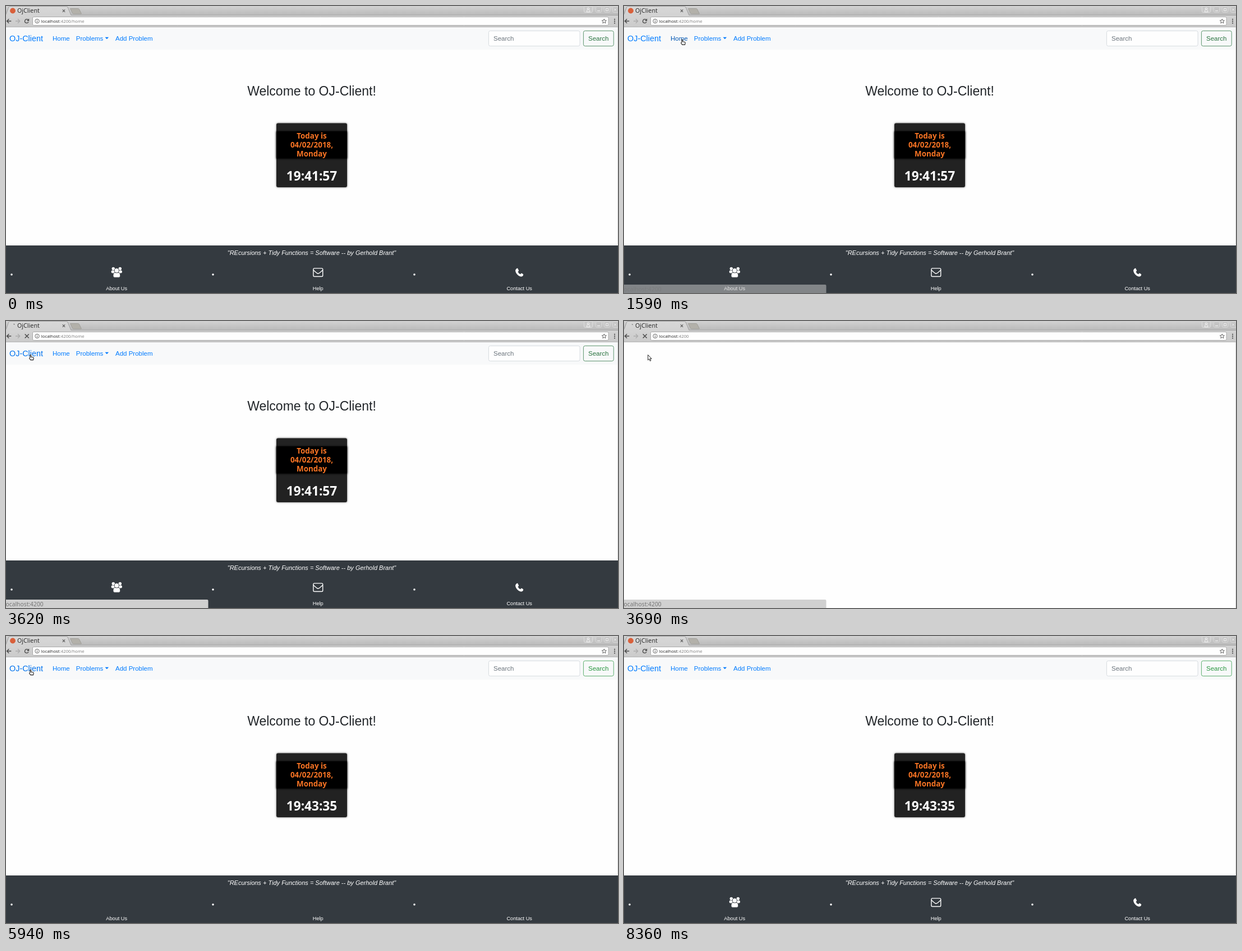
Animation of 1091x513 px, one loop 9340 ms. Source, as an HTML page with a canvas:

```html
<!DOCTYPE html>
<html lang="en">
<head>
<meta charset="utf-8">
<title>OjClient</title>
<style>
  html, body { margin: 0; width: 100%; height: 100%; overflow: hidden; background: #fefefe; }
  canvas { display: block; }
</style>
</head>
<body>
<canvas id="stage" width="1091" height="513"></canvas>
<script>
const W = 1091, H = 513, LOOP = 9340;
const ctx = document.getElementById('stage').getContext('2d');
const SANS = '"Liberation Sans", Arial, sans-serif';
const NOTO = '"Noto Sans", "Open Sans", sans-serif';

// Page life cycle, in ms
const RELOAD = 3400, BLANK = 3680, LOADED = 5935, ICONS = 6005;
const STATUS_IN = 1590, STATUS_FULL = 1640, STATUS_OUT = 3950;

const mix = (a, b, u) => a + (b - a) * u;
const smooth = u => u * u * (3 - 2 * u);
const easeOut = u => 1 - Math.pow(1 - u, 2.1);

// Pointer strokes, sampled in even steps; at(u) gives the place for progress 0..1
const MOVES = [
  { from: 430, to: 1390, steps: 16, at: u => {
    const bend = .855, d = easeOut(u);
    return d < bend
      ? [mix(673, 152.5, d / bend), mix(398, 144.5, d / bend)]
      : [mix(152.5, 103, (d - bend) / (1 - bend)), mix(144.5, 59.5, (d - bend) / (1 - bend))];
  } },
  { from: 2320, to: 3140, steps: 14, at: u => {
    const turn = .42;
    const x = u < turn ? mix(103, 4.8, smooth(u / turn)) : mix(4.8, 43, smooth((u - turn) / (1 - turn)));
    return [x, 60 + 13 * Math.sin(Math.PI * Math.min(1, u / .385))];
  } },
  { from: 6070, to: 6570, steps: 9, at: u => [mix(43, 103, smooth(mix(.1, 1, u))), 60] },
  { from: 8050, to: 8360, steps: 6, at: u => {
    const d = Math.pow((u * 5 + 1) / 5, 1.7);
    return [mix(103, 725, d), mix(60, 503, d)];
  } }
];

function pointer(t) {
  const m = MOVES.filter(s => t >= s.from).pop();
  if (!m) return null;
  const n = m.steps - 1;
  const i = Math.min(n, Math.floor((t - m.from) / (m.to - m.from) * n + 1e-6));
  const [x, y] = m.at(i / n);
  return { x, y };
}

function text(s, x, y, font, color, align = 'left') {
  ctx.font = font;
  ctx.fillStyle = color;
  ctx.textAlign = align;
  ctx.fillText(s, x, y);
}
function rect(x, y, w, h, color) {
  ctx.fillStyle = color;
  ctx.fillRect(x, y, w, h);
}
function round(x, y, w, h, r, fill, stroke, lw = 1) {
  ctx.beginPath();
  ctx.roundRect(x, y, w, h, r);
  paint(fill, stroke, lw);
}
function paint(fill, stroke, lw = 1) {
  if (fill) { ctx.fillStyle = fill; ctx.fill(); }
  if (stroke) { ctx.strokeStyle = stroke; ctx.lineWidth = lw; ctx.stroke(); }
}
function disc(x, y, r, fill, stroke, lw) {
  ctx.beginPath();
  ctx.arc(x, y, r, 0, 7);
  paint(fill, stroke, lw);
}
function shape(d, x, y, fill, stroke, lw = 1) {
  const p = new Path2D(d);
  ctx.save();
  ctx.translate(x, y);
  if (fill) { ctx.fillStyle = fill; ctx.fill(p); }
  if (stroke) { ctx.strokeStyle = stroke; ctx.lineWidth = lw; ctx.stroke(p); }
  ctx.restore();
}
function fade(y0, y1, a, b) {
  const g = ctx.createLinearGradient(0, y0, 0, y1);
  g.addColorStop(0, a);
  g.addColorStop(1, b);
  return g;
}

function spinner(t) {
  const s = (t - BLANK) / 1000;
  const sweep = .45 + 1.9 * (1 - Math.cos(s * 5.77)) / 2;
  const start = -.9 + s * 3;
  ctx.beginPath();
  ctx.arc(12, 8.5, 3.7, start, start + sweep);
  paint(null, '#555', 1.1);
}

function windowButtons() {
  const c = '#eee';
  round(1030.5, .5, 15, 11, 2, '#c9c9c9', '#dedede');
  disc(1038, 4.7, 1.7, null, c, 1.2);
  shape('M0 4 Q0 0 3 0 Q6 0 6 4 Z', 1035, 6.5, null, c);
  for (const x of [1051, 1066, 1081]) round(x + .5, 1.5, 10, 10, 2, '#c4c4c4', '#d8d8d8');
  rect(1054, 8, 5, 1.2, c);
  ctx.strokeStyle = c;
  ctx.strokeRect(1069.5, 4.5, 4, 4);
  shape('M0 0 L4 4 M4 0 L0 4', 1084, 4.5, null, c);
}

function browser(t) {
  const busy = t >= RELOAD && t < LOADED;
  const bare = t >= BLANK && t < LOADED;
  rect(0, 0, W, 17, fade(0, 17, '#d2d2d2', '#b9b9b9'));
  rect(0, 16, W, 1, '#a4a4a4');
  rect(0, 17, W, 21, fade(17, 38, '#d3d3d3', '#cacaca'));
  rect(0, 37, W, 1, '#b4b4b4');
  shape('M-1 17 L5 1.5 Q5.5 .5 7 .5 H107 Q109 .5 110 2 L116 16.5 V17.5 H-1 Z', 0, 0, fade(0, 17, '#d8d8d8', '#d2d2d2'));
  shape('M0 15 L5 1.5 Q5.5 .5 7 .5 H107 Q109 .5 110 2 L116 16.5', 0, 0, null, '#999', .9);
  shape('M0 0 H14 Q15.5 0 16 1.3 L20 9.5 H6 Q4.5 9.5 4 8.3 Z', 114.5, 4.5, '#b3b1aa', '#a09f9a');
  if (busy) spinner(t);
  else disc(12, 8.5, 4.9, '#d9603b');
  text('OjClient', 20, 12.3, '10.7px ' + NOTO, '#303030');
  shape('M0 0 L4.4 4.4 M4.4 0 L0 4.4', 100.8, 6.4, null, '#555', 1.1);
  windowButtons();

  shape('M8.5 4 H1 M4.5 .3 L.8 4 L4.5 7.7', .8, 23, null, '#484848', 1.4);
  shape('M0 4 H7.5 M4 .3 L7.7 4 L4 7.7', 17, 23, null, '#acacac', 1.3);
  if (busy) {
    shape('M0 0 L7 7 M7 0 L0 7', 33.7, 23.6, null, '#484848', 1.4);
  } else {
    ctx.beginPath();
    ctx.arc(37, 27, 3.4, .4, 5.5);
    paint(null, '#484848', 1.3);
    shape('M4.5 0 V4.2 H.3 Z', 36.7, 22.6, '#484848');
  }
  round(47.5, 19.5, 1026.5, 15, 2, '#fefefe', '#a9a9a9');
  disc(55.5, 27, 3.7, null, '#5a5a5a', .9);
  rect(55, 26.5, 1, 2.7, '#5a5a5a');
  rect(55, 24.7, 1, 1, '#5a5a5a');
  const font = '7.8px ' + NOTO;
  text('localhost', 62.7, 29.8, font, '#303030');
  const w = ctx.measureText('localhost').width;
  text(bare ? ':4200' : ':4200/home', 62.7 + w, 29.8, font, '#858585');
  ctx.beginPath();
  for (let i = 0; i < 10; i++) {
    const r = i % 2 ? 1.9 : 4.3, a = i * Math.PI / 5 - Math.PI / 2;
    ctx.lineTo(1066.3 + r * Math.cos(a), 27.3 + r * Math.sin(a));
  }
  ctx.closePath();
  paint(null, '#555', .9);
  for (const y of [23.8, 27.2, 30.6]) disc(1085, y, 1.1, '#4c4c4c');
}

function navbar(late, hover) {
  rect(0, 38, W, 40, '#f8f9fa');
  const blue = '#007bff', nav = '11.5px ' + SANS;
  text('OJ-Client', 6, 63, '14.4px ' + SANS, hover === 'brand' ? '#0072ee' : blue);
  text('Home', 83, 62, nav, hover === 'home' ? '#0056b3' : blue);
  text('Problems', 124.8, 62, nav, blue);
  shape('M0 0 H6.6 L3.3 3.4 Z', 176.5, 55.8, blue);
  text('Add Problem', 195, 62, nav, blue);
  round(860.4, 44.4, 162.7, 27.2, 3, '#fefefe', '#ced4da', .8);
  text('Search', 869, 62, nav, '#6c757d');
  const green = late ? '#28963f' : '#2a7440';
  round(1029.4, 44.4, 53.8, 27.2, 3, null, green, .75);
  text('Search', 1038, 62, nav, green);
}

function clock(late) {
  ctx.save();
  ctx.shadowColor = 'rgba(0,0,0,.6)';
  ctx.shadowBlur = 3.5;
  round(482, 209.5, 126, 114.5, 3, '#222');
  ctx.shadowColor = '#000';
  rect(482, 224, 126, 48.5, '#000');
  ctx.restore();
  ['Today is', '04/02/2018,', 'Monday'].forEach((s, i) =>
    text(s, 545, 237 + 16 * i, 'bold 13.4px ' + NOTO, '#f87424', 'center'));
  text(late ? '19:43:35' : '19:41:57', 545, 311.6, 'bold 22.6px ' + NOTO, '#fff', 'center');
}

function users(x, y) {
  for (const s of [-1, 1]) {
    disc(x + s * 6, y - 6.6, 2.7, '#fff');
    round(x + s * 6.6 - 3, y - 3.6, 6, 5.2, 2, '#fff');
  }
  const body = 'M-3.8 0 Q-6.3 .6 -6.3 6 Q-6.2 8.6 -4 8.6 H4 Q6.2 8.6 6.3 6 Q6.3 .6 3.8 0 Z';
  shape(body, x, y + .6, '#fff', '#343a40', .8);
  disc(x, y - 3.2, 4.1, '#fff', '#343a40', .8);
}

function footer(icons) {
  rect(0, 428, W, 85, '#343a40');
  text('"REcursions + Tidy Functions = Software -- by Gerhold Brant"', 545, 445.3,
    'italic 11px ' + SANS, '#fff', 'center');
  ['About Us', 'Help', 'Contact Us'].forEach((s, i) => {
    disc(10 + 359 * i, 480, 1.8, '#fff');
    text(s, 197.2 + 359 * i, 508, '9.2px ' + SANS, '#fff', 'center');
  });
  if (!icons) return;
  users(197.3, 476);
  round(547.9, 468.9, 16.8, 14.6, 1.8, null, '#fff', 1.4);
  shape('M0 0 Q5 4.6 7 5.8 Q8.4 6.6 9.8 5.8 Q12 4.6 16.8 0', 547.9, 472, null, '#fff', 1.4);
  shape('M.2 3 Q1.5 .4 3.8 .1 L6 4.5 Q5.5 5.5 4.3 6.5 Q5.5 9.7 8.8 11.1 Q10 9.5 10.8 9.1 L14 11.1' +
    ' Q14.3 13.5 12 14.8 Q9.5 16.1 5.5 13.5 Q.8 10 -.1 5 Z', 908.2, 468.5, '#fff');
}

function status(t) {
  if (t < STATUS_IN || t >= STATUS_OUT) return;
  ctx.save();
  ctx.globalAlpha = t < STATUS_FULL ? .5 : 1;
  round(-4, 498, 364.5, 19, 2, '#d0d0d0');
  text('ocalhost:4200', -.5, 510, '10.3px ' + NOTO, '#757575');
  ctx.restore();
}

function cursor(p, hand) {
  if (hand) {
    shape('M.1 1.2 Q.9 0 1.8 1.2 V4.2 L5 4.7 Q6.6 5 6.4 6.6 L5.8 9.6 H1 L-1 7 Q-1.5 5.7 0 5.7 Z',
      p.x - .2, p.y, '#fff', '#222', 1.1);
  } else {
    shape('M0 0 V9.4 L2.1 7.4 L3.7 11 L5.3 10.3 L3.7 6.9 H6.5 Z', p.x - .3, p.y + .5, '#fff', '#222', 1);
  }
}

function linkUnder(p) {
  if (!p || p.y < 45 || p.y > 71) return '';
  if (p.x > 4 && p.x < 67) return 'brand';
  return p.x > 77 && p.x < 120 ? 'home' : '';
}

function draw(t) {
  const blank = t >= BLANK && t < LOADED, late = t >= LOADED;
  const p = pointer(t), hover = blank ? '' : linkUnder(p);
  rect(0, 0, W, H, '#fefefe');
  if (!blank) {
    navbar(late, hover);
    text('Welcome to OJ-Client!', 545, 160, '23px ' + SANS, '#212529', 'center');
    clock(late);
  }
  rect(1090, 38, 1, 475, '#d9d9d9');
  if (!blank) footer(t < BLANK || t >= ICONS);
  browser(t);
  status(t);
  // The pointer has left the stage once the last stroke is over
  if (p && t < MOVES[MOVES.length - 1].to) cursor(p, hover);
}

const begin = performance.now();
function tick() {
  draw((performance.now() - begin) % LOOP);
  requestAnimationFrame(tick);
}
tick();
</script>
</body>
</html>
```
